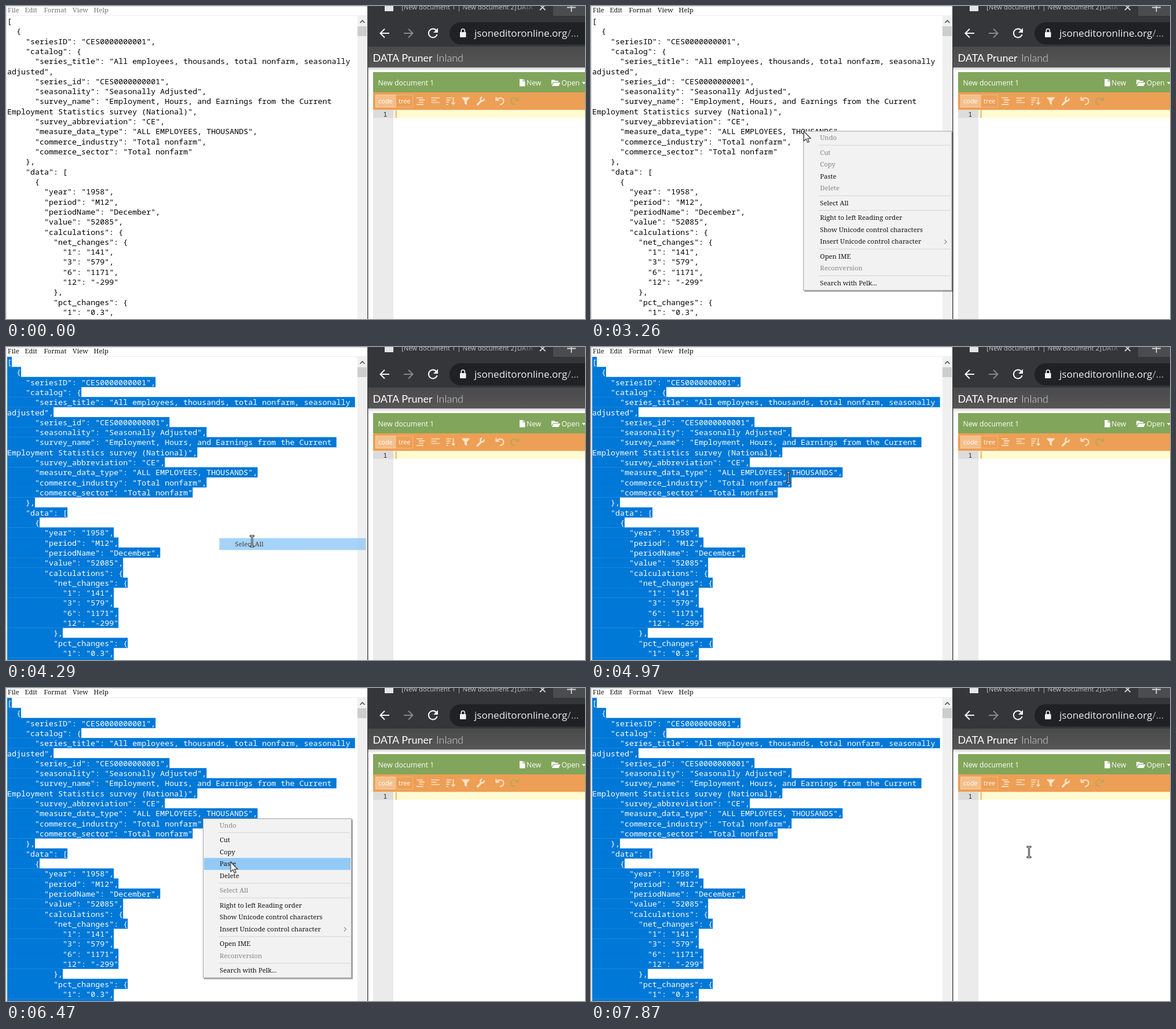
Animation of 1000x540 px, one loop 8000 ms. Source, as an HTML page:

```html
<!DOCTYPE html>
<html lang="en">
<head>
<meta charset="utf-8">
<title>Copying a document</title>
<style>
html, body { margin: 0; width: 100%; height: 100%; overflow: hidden; background: #fff; }
svg { display: block; width: 1000px; height: 540px; }
text { white-space: pre; }
.mono { font: 13.35px "Noto Sans Mono", monospace; }
.menu { font: 500 11.3px "Noto Serif", serif; }
.ui { font-family: "Open Sans", sans-serif; }
.name { font-family: Lato, sans-serif; font-size: 18px; }
</style>
</head>
<body>
<svg id="stage" viewBox="0 0 1000 540" xmlns="http://www.w3.org/2000/svg">
  <defs>
    <linearGradient id="bar" x2="0" y2="1">
      <stop offset="0" stop-color="#4a4a4a"/><stop offset="1" stop-color="#565656"/>
    </linearGradient>
    <linearGradient id="under" x2="0" y2="1">
      <stop offset="0" stop-color="#cfcfcf"/><stop offset="1" stop-color="#fff"/>
    </linearGradient>
    <linearGradient id="fade">
      <stop offset="0" stop-color="#c3c5c8"/><stop offset="1" stop-color="#5a5b5f"/>
    </linearGradient>
  </defs>
  <rect width="1000" height="540" fill="#fff"/>

  <g id="notepad">
    <path d="M0 .5H624M.5 0V540" stroke="#d4d4d4"/>
    <path d="M1 16.5H624" stroke="#ececec"/>
    <g id="titles" class="menu"></g>
    <g id="selection" fill="#0078d7"></g>
    <g id="lines" class="mono"></g>
    <rect x="607" y="17" width="17" height="523" fill="#f0f0f0"/>
    <rect x="607" y="35" width="16" height="17" fill="#cdcdcd"/>
    <path d="M611.5 29l4-4 4 4" fill="none" stroke="#505050" stroke-width="1.6"/>
  </g>

  <g id="browser">
    <rect x="625" width="375" height="70" fill="#35363a"/>
    <rect x="945" width="55" height="17" fill="#4b4c4f"/>
    <rect x="654" y="0" width="15" height="9" fill="#e4e5e7"/>
    <g class="ui" font-size="11.3">
      <text x="683" y="6" fill="#c3c5c8">[New document 1 | New document 2]</text>
      <text x="883" y="6" fill="url(#fade)">DATA</text>
    </g>
    <path d="M922 -2l9.500 9M931.500 -2l-9.500 9M969 2.500h15M976.500 -5v15" stroke="#d5d6d8" stroke-width="1.8"/>
    <g fill="none" stroke="#f1f2f4" stroke-width="2.100">
      <path d="M662 47H646.500M654 39.500l-7.500 7.500 7.500 7.500"/>
      <path d="M687 47h15.500M695 39.500l7.500 7.500-7.500 7.500" stroke="#85868a"/>
      <path d="M743.500 42.500A7.500 7.500 0 1 0 744.600 49"/>
    </g>
    <path d="M746 38v8h-8z" fill="#f1f2f4"/>
    <rect x="766" y="28" width="260" height="38.500" rx="19.250" fill="#202124"/>
    <rect x="784" y="45" width="10.500" height="9" rx="1" fill="#f1f2f4"/>
    <path d="M786.300 45v-2.500a3 3 0 0 1 6 0V45" fill="none" stroke="#f1f2f4" stroke-width="1.600"/>
    <text class="ui" x="809" y="53" font-size="17" fill="#f0f1f3">jsoneditoronline.org<tspan fill="#a4a8ad">/...</tspan></text>

    <rect x="625" y="70" width="375" height="36" fill="url(#bar)"/>
    <text class="name" x="633.500" y="96" fill="#fff">DATA Pruner</text>
    <text class="name" x="743" y="96" fill="#d8d8d8" font-weight="300">Inland</text>
    <rect x="625" y="106" width="375" height="6" fill="url(#under)"/>

    <rect x="634" y="114" width="366" height="35" fill="#82a55c"/>
    <g class="ui" font-size="12.200" fill="#fff">
      <text x="642.500" y="137">New document 1</text>
      <text x="899" y="137">New</text>
      <text x="959.500" y="137">Open</text>
      <path d="M887 126h5.500v4h4v8.500H887zM893.500 126l3 3h-3z"/>
      <path d="M942 136v-8.500h5l1.500 1.500h5.500v2h-8.500zM942.800 138l3.200-6h11.500l-3 6z"/>
      <path d="M994.500 131h7l-3.500 4z"/>
    </g>

    <rect x="634" y="149" width="366" height="30.500" fill="#ed9f55"/>
    <g stroke="#f8d2aa">
      <rect x="638.500" y="153.500" width="35" height="21" fill="#f4bf8b"/>
      <rect x="673.500" y="153.500" width="29" height="21" fill="none" stroke="#f3b880"/>
    </g>
    <g class="ui" font-size="11" font-weight="500" fill="#fff">
      <text x="643" y="168">code</text>
      <text x="678" y="168">tree</text>
    </g>
    <g fill="none" stroke="#fbe3c9" stroke-width="1.700">
      <path d="M709 158.500h11M713 162.200h10M713 166h8M709 169.800h12"/>
      <path d="M734.500 158.500h14.500M734.500 162.500h9M734.500 166.500h14.500"/>
      <path d="M760.500 158.500h9M760.500 162.300h7M760.500 166.100h5M760.500 169.800h3M772.500 157.500v12M769.500 166.500l3 3 3-3"/>
      <path d="M814.500 170l6.500-6.500" stroke-width="3.400" stroke-linecap="round"/>
      <path d="M825.500 159.500a3.200 3.200 0 1 1-3.200-2.200" stroke-width="2.500"/>
      <path id="undo" d="M848 161.500c3-4.500 11-3.500 11.500 2 .2 4-3 6.500-6.500 6.500M846.500 157v5.500h5.500" stroke-width="2"/>
      <path d="M883.500 161.500c-3-4.500-11-3.500-11.500 2-.2 4 3 6.500 6.500 6.500M885 157v5.500h-5.500" stroke="#b8a657" stroke-width="2"/>
    </g>
    <path d="M786.500 157.500h15l-5.500 6.500v7l-4-3v-4z" fill="#fbe3c9"/>

    <rect x="634" y="179.500" width="35" height="361" fill="#ebebeb"/>
    <rect x="634" y="179.500" width="35" height="13.500" fill="#dcdcdc"/>
    <rect x="669" y="179.500" width="331" height="13.500" fill="#fffbd1"/>
    <text x="651.500" y="190.500" font-size="11" font-family="DejaVu Sans Mono, monospace" fill="#333">1</text>
    <path d="M673.700 180v13" stroke="#e2a468" stroke-width="1.600"/>
    <path d="M624.800 0V540" stroke="#3a3b3e" stroke-width="1.400"/>
  </g>

  <g id="menus" class="menu"></g>
  <g id="cursor">
    <path id="arrow" d="M0 0V17L4 13.500 6.700 19.500 9.300 18.300 6.700 12.500H12Z" fill="#f4f4f4" stroke="#3c3c3c" stroke-width="1.200"/>
    <g id="beam" fill="none">
      <path d="M-4 -9H4M-4 9H4M0 -9V9" stroke="#222" stroke-width="3"/>
      <path d="M-3 -9H3M-3 9H3M0 -9V9" stroke="#f4f4f4"/>
    </g>
  </g>
</svg>
<script>
const LOOP = 8000;
const PITCH = 8.01, LEADING = 17.31;
const $ = id => document.getElementById(id);

function add(parent, tag, attrs, label) {
  const el = document.createElementNS('http://www.w3.org/2000/svg', tag);
  for (const k in attrs) el.setAttribute(k, attrs[k]);
  if (label) el.textContent = label;
  return parent.appendChild(el);
}

const doc = `[
  {
    "seriesID": "CES0000000001",
    "catalog": {
      "series_title": "All employees, thousands, total nonfarm, seasonally~
adjusted",
      "series_id": "CES0000000001",
      "seasonality": "Seasonally Adjusted",
      "survey_name": "Employment, Hours, and Earnings from the Current~
Employment Statistics survey (National)",
      "survey_abbreviation": "CE",
      "measure_data_type": "ALL EMPLOYEES, THOUSANDS",
      "commerce_industry": "Total nonfarm",
      "commerce_sector": "Total nonfarm"
    },
    "data": [
      {
        "year": "1958",
        "period": "M12",
        "periodName": "December",
        "value": "52085",
        "calculations": {
          "net_changes": {
            "1": "141",
            "3": "579",
            "6": "1171",
            "12": "-299"
          },
          "pct_changes": {
            "1": "0.3",
            "3": "1.1",`;

// A tilde marks the space left at a soft wrap.
doc.split('\n').forEach((raw, i) => {
  const line = raw.replace('~', ' ');
  const indent = line.search(/\S/);
  add($('lines'), 'text', { x: 2 + indent * PITCH, y: 31 + i * LEADING }, line.trim());
  add($('selection'), 'rect', {
    x: 2, y: 17 + i * LEADING, width: line.length * PITCH, height: LEADING + 0.3
  });
});

[['File', 3], ['Edit', 32.5], ['Format', 65.5], ['View', 115], ['Help', 151.5]]
  .forEach(([label, x]) => add($('titles'), 'text', { x, y: 10.7 }, label));

const ITEMS = ['Undo', '-', 'Cut', 'Copy', 'Paste', 'Delete', '-', 'Select All', '-',
  'Right to left Reading order', 'Show Unicode control characters',
  'Insert Unicode control character', '-', 'Open IME', 'Reconversion', '-',
  'Search with Pelk...'];
const ROW = 20.6, GAP = 4.8;

function makeMenu(x, y, open, close, pick, disabled) {
  const root = add($('menus'), 'g', { transform: `translate(${x} ${y})` });
  const panel = add(root, 'g', {});
  add(panel, 'rect', { x: 2, y: 2, width: 257, height: 275.5, fill: '#000', opacity: 0.35 });
  add(panel, 'rect', { x: 0.5, y: 0.5, width: 256, height: 274.5, fill: '#f2f2f2', stroke: '#a0a0a0' });
  const light = add(root, 'rect', { x: 2, width: 253, height: ROW, fill: '#91c9f7' });
  const rows = [];
  let top = 1.6;
  for (const label of ITEMS) {
    if (label === '-') {
      add(panel, 'path', { d: `M27 ${top + GAP / 2}H254`, stroke: '#d4d4d4' });
      top += GAP;
      continue;
    }
    const off = disabled.includes(label);
    const text = add(root, 'text', { x: 29, y: top + 14, fill: off ? '#878787' : '#161616' }, label);
    if (label.startsWith('Insert'))
      add(panel, 'path', { d: `M244 ${top + 7}l3.500 3.500-3.500 3.500`, fill: 'none', stroke: '#444' });
    rows.push({ label, top, off, text });
    top += ROW;
  }
  return { root, panel, light, rows, y, open, close, pick };
}

const menus = [
  makeMenu(366.5, 215.5, 3010, 4210, 'Select All', ['Undo', 'Cut', 'Copy', 'Delete', 'Reconversion']),
  makeMenu(340, 225, 5060, 6940, 'Copy', ['Undo', 'Select All', 'Reconversion'])
];

function drawMenu(m, t, cursorY) {
  const isOpen = t >= m.open && t < m.close;
  const closing = t >= m.close && t < m.close + 380;
  m.root.style.display = isOpen || closing ? '' : 'none';
  if (!isOpen && !closing) return isOpen;
  const hit = m.rows.find(r => closing ? r.label === m.pick
    : !r.off && cursorY >= m.y + r.top && cursorY < m.y + r.top + ROW);
  m.panel.style.display = closing ? 'none' : '';
  m.light.style.display = hit ? '' : 'none';
  if (hit) m.light.setAttribute('y', hit.top);
  m.rows.forEach(r => r.text.style.display = closing && r !== hit ? 'none' : '');
  m.root.setAttribute('opacity', closing
    ? 1 - (t - m.close) / 380
    : Math.min(1, 0.3 + (t - m.open) / 300));
  return isOpen;
}

// Bursts of screen updates: first, last, count.
const BURSTS = [[450, 1230, 11], [1310, 1770, 7], [2240, 2330, 2], [3010, 3260, 4],
  [3410, 3730, 5], [3890, 4050, 3], [4210, 4970, 11], [5060, 5300, 4],
  [5440, 6230, 11], [6310, 6630, 5], [6790, 6790, 1], [6940, 7640, 10], [7790, 7870, 2]];

function snap(t) {
  let out = 0;
  for (const [first, last, count] of BURSTS) {
    if (t < first) break;
    const step = (last - first) / (count - 1) || 1;
    out = Math.min(last, first + Math.floor((t - first) / step + 0.15) * step);
  }
  return out;
}

// Cursor hot spot: time, x, y.
const PATH = [[450, 951, 528], [530, 915, 485], [762, 740, 305], [1000, 577, 234],
  [1230, 501, 216], [1310, 478, 213], [1463, 405, 206], [1540, 391, 207],
  [1770, 368, 216], [3260, 367.5, 216], [3410, 371, 226], [3730, 406, 312],
  [3890, 417, 326], [4050, 425, 335], [4520, 425, 335], [4970, 341, 225],
  [5300, 341, 225], [5440, 348, 240], [5677, 364, 262], [5950, 378, 300],
  [6230, 386, 338], [6310, 389, 354], [6470, 388, 300], [6630, 381, 284],
  [6790, 377, 273], [7020, 377, 273], [7640, 782, 285], [7790, 770, 284],
  [7870, 756.5, 283]];

function cursorAt(t) {
  const i = PATH.findIndex(p => p[0] > t);
  if (i < 0) return PATH[PATH.length - 1].slice(1);
  if (i === 0) return PATH[0].slice(1);
  const [t0, x0, y0] = PATH[i - 1], [t1, x1, y1] = PATH[i];
  const k = (t - t0) / (t1 - t0);
  return [x0 + (x1 - x0) * k, y0 + (y1 - y0) * k];
}

function draw(now) {
  const t = snap(now % LOOP);
  const [x, y] = cursorAt(t);
  const selected = t >= 4210;
  $('titles').setAttribute('fill', t >= 2240 ? '#161616' : '#777');
  $('selection').style.display = selected ? '' : 'none';
  $('lines').setAttribute('fill', selected ? '#fff' : '#000');
  const overMenu = menus.map(m => drawMenu(m, t, y)).some(Boolean);
  $('cursor').style.display = t < 450 ? 'none' : '';
  $('cursor').setAttribute('transform', `translate(${x} ${y})`);
  $('arrow').style.display = overMenu ? '' : 'none';
  $('beam').style.display = overMenu ? 'none' : '';
}

const start = performance.now();
function tick() {
  draw(performance.now() - start);
  requestAnimationFrame(tick);
}
tick();
</script>
</body>
</html>
```
